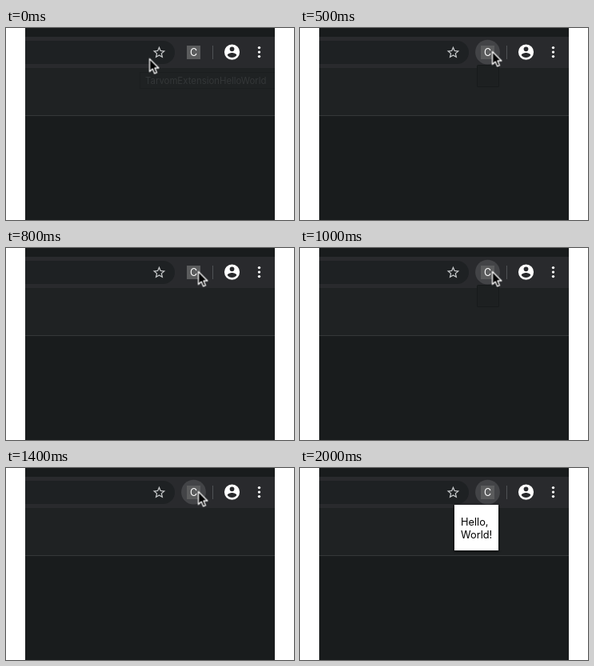
An HTML page for the animation above (2400 ms loop, 360 by 240 pixels).

```html
<!DOCTYPE html>
<html lang="en">
<head>
<meta charset="utf-8">
<title>Toolbar popup</title>
<style>
  html, body { margin: 0; width: 100%; height: 100%; overflow: hidden; background: #fff; }
  svg { display: block; width: 360px; height: 240px; }
  text { font-family: Inter, "Liberation Sans", sans-serif; }

  .tip, .hover, .ghost, .popup, .cursor { animation: 2400ms step-end infinite; }
  .tip { animation-name: tip; }
  .hover { animation-name: hover; }
  .ghost { animation-name: ghost; }
  .popup { animation-name: popup; }
  .cursor { animation-name: cursor; }

  @keyframes tip {
    0% { opacity: 1; }
    4.16%, 100% { opacity: 0; }
  }
  @keyframes hover {
    0%, 33.33%, 62.49% { opacity: 0; }
    12.49%, 37.49%, 70.83%, 100% { opacity: 1; }
  }
  @keyframes ghost {
    0%, 24.99%, 49.99%, 79.16%, 100% { opacity: 0; }
    20.83%, 41.66%, 74.99% { opacity: 1; }
  }
  @keyframes popup {
    0%, 33.33%, 58.33% { opacity: 0; }
    24.99%, 49.99%, 79.16%, 100% { opacity: 1; }
  }
  @keyframes cursor {
    0% { transform: translate(179.5px, 38.5px); }
    4.16% { transform: translate(204px, 34px); }
    8.33% { transform: translate(230px, 30.5px); }
    12.49% { transform: translate(240.5px, 29.5px); }
    79.16% { transform: translate(241px, 4px); }
    83.33%, 100% { transform: translate(241px, -40px); }
  }
</style>
</head>
<body>
<svg viewBox="0 0 360 240">
  <defs>
    <clipPath id="window"><rect x="24" width="312" height="240"/></clipPath>
    <filter id="blur" x="-20%" y="-20%" width="140%" height="140%">
      <feGaussianBlur stdDeviation="1.5"/>
    </filter>
  </defs>

  <g clip-path="url(#window)">
    <!-- browser window -->
    <rect x="24" width="312" height="240" fill="#191c1d"/>
    <rect x="24" y="11" width="312" height="39" fill="#292a2d"/>
    <rect x="24" y="50" width="312" height="59" fill="#1f2223"/>
    <rect x="24" y="109" width="312" height="1" fill="#353839"/>
    <rect x="0" y="16" width="211" height="29" rx="14.5" fill="#1e2123"/>

    <!-- toolbar icons -->
    <path transform="translate(182.1 21.2) scale(.78)" fill="#c6c8ca" d="M22 9.24l-7.19-.62L12 2 9.19 8.63 2 9.24l5.46 4.73L5.82 21 12 17.27 18.18 21l-1.63-7.03L22 9.24zM12 15.4l-3.76 2.27 1-4.28-3.32-2.88 4.38-.38L12 6.1l1.71 4.04 4.38.38-3.32 2.88 1 4.28L12 15.4z"/>
    <circle class="hover" cx="234.5" cy="30.2" r="15.4" fill="#434447"/>
    <rect x="226" y="22" width="17" height="17" fill="#5b5c5d"/>
    <text x="234.6" y="34.7" font-size="12.5" text-anchor="middle" fill="#fff">C</text>
    <rect x="258" y="22" width="1" height="17" fill="#505255"/>
    <path transform="translate(271 18.6) scale(.96)" fill="#fff" d="M12 2a10 10 0 1 0 0 20 10 10 0 1 0 0-20zm0 3a3 3 0 1 1 0 6 3 3 0 1 1 0-6zm0 14.2c-2.5 0-4.71-1.28-6-3.22.03-1.99 4-3.08 6-3.08 1.99 0 5.97 1.09 6 3.08-1.29 1.94-3.5 3.22-6 3.22z"/>
    <g fill="#fff">
      <circle cx="316.5" cy="24.6" r="1.7"/>
      <circle cx="316.5" cy="30.1" r="1.7"/>
      <circle cx="316.5" cy="35.6" r="1.7"/>
    </g>

    <!-- fading tooltip -->
    <g class="tip">
      <rect x="167.5" y="55.5" width="180" height="20" fill="none" stroke="#1b1e1f"/>
      <text x="174" y="69.5" font-size="11.4" fill="#343738">TarvomExtensionHelloWorld</text>
    </g>

    <!-- popup, first as a small empty frame -->
    <rect class="ghost" x="221.5" y="46.5" width="27" height="27" rx="1" fill="#1d2021" stroke="#171a1b"/>
    <g class="popup">
      <rect x="192.5" y="46.5" width="56" height="58" fill="#0b0c0d" opacity=".75" filter="url(#blur)"/>
      <rect x="193" y="46" width="55" height="57" fill="#fff"/>
      <g font-size="12.8" fill="#000">
        <text x="201" y="71.7">Hello,</text>
        <text x="201" y="87.7">World!</text>
      </g>
    </g>

    <path class="cursor" d="M0 0V16L3.7 12.6 6.2 18.4 9 17.2 6.5 11.5H11.4Z" fill="#000" stroke="#fff" stroke-width="1.3" stroke-linejoin="round"/>
  </g>
</svg>
</body>
</html>
```
